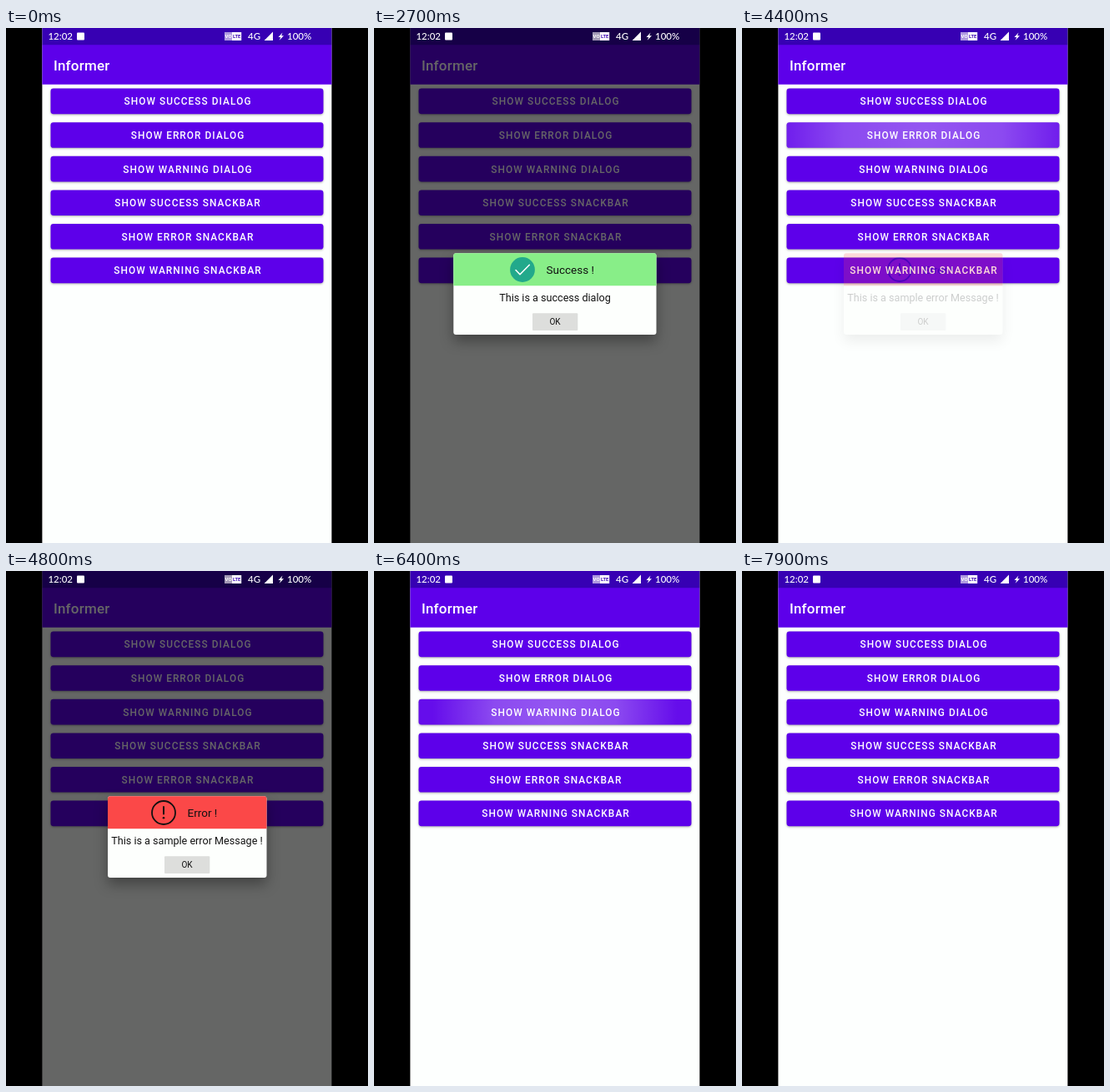
An HTML page with a canvas for the animation above (8000 ms loop, 434x618 px).

```html
<!DOCTYPE html>
<html lang="en">
<head>
<meta charset="utf-8">
<title>Dialogs</title>
<style>
  html, body { margin: 0; width: 100%; height: 100%; overflow: hidden; background: #000; }
  canvas { display: block; width: 434px; height: 618px; }
</style>
</head>
<body>
<canvas id="stage"></canvas>
<script>
const W = 434, H = 618, LOOP = 8000, STEP = 100;
const LEFT = 43.4, WIDTH = 347, MID = 217;
const PURPLE = '#5d00ea';
const ROBOTO = 'Roboto, sans-serif';
const LABELS = ['SUCCESS DIALOG', 'ERROR DIALOG', 'WARNING DIALOG',
  'SUCCESS SNACKBAR', 'ERROR SNACKBAR', 'WARNING SNACKBAR'];

const DIALOGS = [
  { open: 2200, close: 3500, x: 95.3, w: 243.2, head: '#88ee88', icon: checkIcon,
    title: 'Success !', titleX: 206.5, text: 'This is a success dialog' },
  { open: 4400, close: 5600, x: 122, w: 190.5, head: '#fb4848', icon: errorIcon,
    title: 'Error !', titleX: 217.5, text: 'This is a sample error Message !' },
  { open: 6500, close: 7700, x: 117.7, w: 198.6, head: '#e7d950', icon: warningIcon,
    title: 'Warning !', titleX: 207.5, text: 'This is sample warning message !' }
];

const scale = Math.max(1, window.devicePixelRatio || 1);
const screen = makeLayer(document.getElementById('stage'));
const overlay = makeLayer(document.createElement('canvas'));

function makeLayer(canvas) {
  canvas.width = W * scale;
  canvas.height = H * scale;
  const ctx = canvas.getContext('2d');
  ctx.scale(scale, scale);
  return ctx;
}

const clamp = v => Math.min(1, Math.max(0, v));

function rect(c, x, y, w, h, fill, r = 0) {
  c.fillStyle = fill;
  c.beginPath();
  c.roundRect(x, y, w, h, r);
  c.fill();
}

function text(c, str, x, y, font, fill, align = 'left', spacing = 0) {
  c.font = font;
  c.fillStyle = fill;
  c.textAlign = align;
  c.letterSpacing = spacing + 'px';
  c.fillText(str, x, y);
}

function line(c, points, color, width, close) {
  c.strokeStyle = color;
  c.lineWidth = width;
  c.lineCap = c.lineJoin = 'round';
  c.beginPath();
  points.forEach(([x, y]) => c.lineTo(x, y));
  if (close) c.closePath();
  c.stroke();
}

function disc(c, x, y, r, fill) {
  c.fillStyle = fill;
  c.beginPath();
  c.arc(x, y, r, 0, Math.PI * 2);
  c.fill();
}

function polygon(c, points, fill) {
  c.fillStyle = fill;
  c.beginPath();
  points.forEach(([x, y]) => c.lineTo(x, y));
  c.fill();
}

function shadow(c, color, blur, dy) {
  c.shadowColor = color;
  c.shadowBlur = blur * scale;
  c.shadowOffsetY = dy * scale;
}

function checkIcon(c) {
  disc(c, 178, 290, 14.9, '#22a98b');
  line(c, [[170, 290.5], [175, 295.7], [186.3, 284.3]], '#fff', 1.6);
}

function errorIcon(c) {
  c.strokeStyle = '#111';
  c.lineWidth = 1.8;
  c.beginPath();
  c.arc(189, 290, 14, 0, Math.PI * 2);
  c.stroke();
  line(c, [[189, 283], [189, 291.5]], '#111', 2);
  disc(c, 189, 296.3, 1.3, '#111');
}

function warningIcon(c) {
  line(c, [[178.5, 280.2], [190.8, 300], [166.2, 300]], '#111', 2.2, true);
  line(c, [[178.5, 287], [178.5, 292.5]], '#111', 2);
  disc(c, 178.5, 296.3, 1.2, '#111');
}

// Press ripple that starts shortly before its dialog and fades under it.
function ripple(c, y, age) {
  const grow = clamp((age + 300) / 300);
  const alpha = 0.34 * (1 - clamp(age / 200));
  if (age < -200 || alpha <= 0) return;
  const reach = 60 + 130 * grow;
  const g = c.createRadialGradient(MID, y + 15, 0, MID, y + 15, reach);
  g.addColorStop(0, `rgba(255,255,255,${alpha})`);
  g.addColorStop(0.5, `rgba(255,255,255,${alpha * 0.85})`);
  g.addColorStop(1, `rgba(255,255,255,${alpha * 0.15})`);
  rect(c, 53.5, y, 327, 30.6, g, 3.4);
}

function drawPage(c, t) {
  rect(c, 0, 0, W, H, '#000');
  rect(c, LEFT, 0, WIDTH, H, '#fdfffe');
  rect(c, LEFT, 20, WIDTH, 47.8, PURPLE);
  rect(c, LEFT, 0, WIDTH, 20.2, '#3700b3');
  text(c, 'Informer', 56.9, 50.7, '500 17px ' + ROBOTO, '#fff', 'left', 0.22);
  LABELS.forEach((label, i) => {
    const y = 72.6 + i * 40.6;
    c.save();
    shadow(c, 'rgba(0,0,0,.32)', 2.5, 1);
    rect(c, 53.5, y, 327, 30.6, PURPLE, 3.4);
    c.restore();
    if (DIALOGS[i]) ripple(c, y, t - DIALOGS[i].open);
    text(c, 'SHOW ' + label, MID + 1, y + 19.8, '500 11.86px ' + ROBOTO, '#fff', 'center', 1.06);
  });
}

function drawStatus(c) {
  const font = '500 11.5px Lato, sans-serif';
  text(c, '12:02', 50.4, 14.2, font, '#fff');
  rect(c, 85, 5.5, 9, 9, '#fff', 1);
  rect(c, 262, 5, 9.5, 10, 'rgba(255,255,255,.6)');
  rect(c, 271, 5, 11.2, 10, '#fff');
  text(c, 'VO', 266.6, 12.3, '700 6px ' + ROBOTO, '#fff', 'center');
  text(c, 'LTE', 276.6, 12.3, '700 5.8px ' + ROBOTO, '#3700b3', 'center');
  text(c, '4G', 290, 14.2, font, '#fff');
  polygon(c, [[320, 4.6], [320, 15], [309.6, 15]], '#fff');
  polygon(c, [[331.5, 5.5], [326.5, 11], [329.3, 11], [327.7, 14.8], [333, 9.2], [330.2, 9.2]], '#fff');
  text(c, '100%', 337, 14.2, font, '#fff');
}

function drawDialog(c, d) {
  c.clearRect(0, 0, W, H);
  c.save();
  shadow(c, 'rgba(0,0,0,.34)', 16, 8);
  rect(c, d.x, 270.3, d.w, 97.7, '#fdfffd', 3);
  c.restore();
  rect(c, d.x, 270.3, d.w, 39, d.head, [3, 3, 0, 0]);
  d.icon(c);
  text(c, d.title, d.titleX, 295, '13.5px ' + ROBOTO, '#111');
  text(c, d.text, MID, 328.2, '12.6px ' + ROBOTO, '#111', 'center');
  rect(c, 190, 342.3, 54.3, 20.8, '#dddedc', 1);
  text(c, 'OK', MID, 356.2, '10px ' + ROBOTO, '#111', 'center');
}

function fade(d, t) {
  if (t < d.close) {
    const age = t - d.open;
    return { alpha: clamp((age + 30) / 150), dim: 0.6 * clamp(age / 180) };
  }
  const age = t - d.close;
  return { alpha: 1 - clamp((age + 75) / 100), dim: 0.6 * (1 - clamp((age + 100) / 185)) };
}

function draw(t) {
  drawPage(screen, t);
  const d = DIALOGS.find(d => t >= d.open && t < d.close + 200);
  if (d) {
    const { alpha, dim } = fade(d, t);
    rect(screen, 0, 0, W, H, `rgba(0,0,0,${dim})`);
    drawDialog(overlay, d);
    screen.globalAlpha = alpha;
    screen.drawImage(overlay.canvas, 0, 0, W, H);
    screen.globalAlpha = 1;
  }
  drawStatus(screen);
}

const start = performance.now();
function tick() {
  const t = (performance.now() - start) % LOOP;
  draw(Math.floor(t / STEP) * STEP);
  requestAnimationFrame(tick);
}
tick();
</script>
</body>
</html>
```
